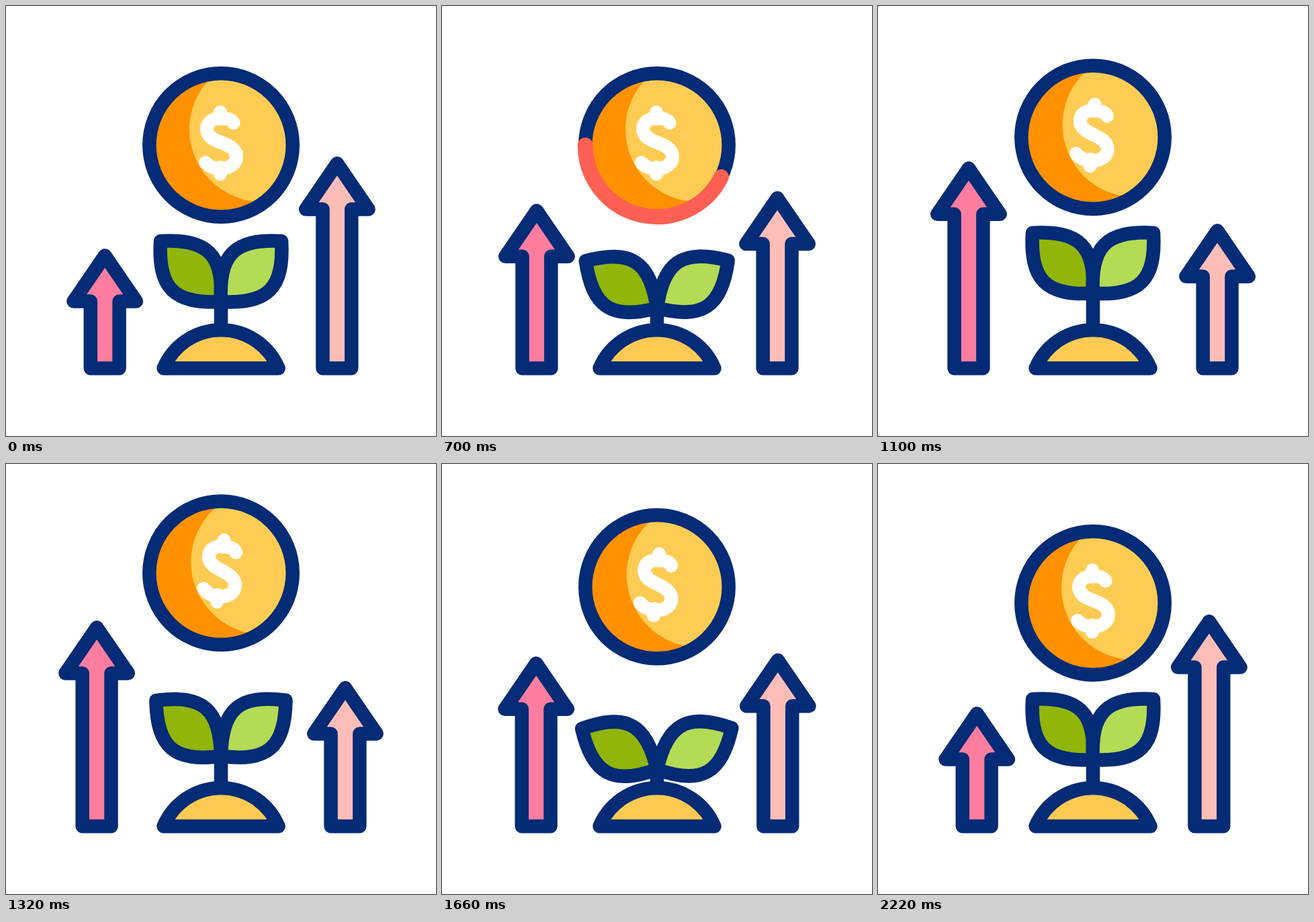
Animation, 640 px wide and 640 px high, one loop 2400 ms. Source, as an HTML page:

```html
<!DOCTYPE html>
<html lang="en">
<head>
<meta charset="utf-8">
<title>Growing investment</title>
<style>
  html, body { margin: 0; width: 100%; height: 100%; overflow: hidden; background: #fff; }
  svg { display: block; width: 100%; height: 100%; }
  .line { stroke: #032b76; stroke-width: 20.5; stroke-linecap: round; stroke-linejoin: round; }
</style>
</head>
<body>
<svg viewBox="0 0 640 640">
  <defs>
    <clipPath id="disc"><circle cx="320" cy="207" r="106.7"/></clipPath>
    <path id="leaf" d="M320 440C250 444 226 420 230 350C300 346 324 370 320 440Z"/>
  </defs>

  <path id="small" class="line" fill="#ff7d9f"/>
  <path id="tall" class="line" fill="#ffbdb8"/>

  <path id="stem" class="line" fill="none"/>
  <use id="left" class="line" href="#leaf" fill="#91b508"/>
  <use id="right" class="line" href="#leaf" fill="#b3db54"/>
  <path class="line" fill="#ffca52" d="M234.5 539.3A92.6 92.6 0 0 1 405.5 539.3Z"/>

  <g id="coin">
    <g id="face">
      <circle cx="320" cy="207" r="106.7" fill="#ff9100"/>
      <circle cx="381" cy="183.5" r="108" fill="#ffcc53" clip-path="url(#disc)"/>
      <path fill="none" stroke="#fff" stroke-width="20" stroke-linecap="round" stroke-linejoin="round"
        d="M338.5 174C336 168 327 167 320 167C308 167 299 173 299 183C299 194 309 199 320 203C333 208 343 213 343 224C343 236 332 242 319 242C309 242 301 238 297 233M319 158V168M319 240V250"/>
    </g>
    <circle class="line" cx="320" cy="207" r="106.7" fill="none"/>
    <path id="sweep" fill="none" stroke="#ff6053" stroke-width="23" stroke-linecap="round"/>
  </g>
</svg>
<script>
const LOOP = 2400, STEP = 20;
const el = id => document.getElementById(id);
const clamp = u => Math.min(1, Math.max(0, u));
const smooth = u => u * u * (3 - 2 * u);

// Eased value through [time, value] keys
function track(keys, t) {
  if (t <= keys[0][0]) return keys[0][1];
  for (let i = 1; i < keys.length; i++) {
    const [t0, a] = keys[i - 1], [t1, b] = keys[i];
    if (t < t1) return a + (b - a) * smooth((t - t0) / (t1 - t0));
  }
  return keys[keys.length - 1][1];
}

const swap = [[200, 0], [1200, 1], [2200, 0]];
const leafDrop = [[200, 0], [600, 12.3], [1080, -12.3], [1180, -12.3], [1600, 15], [2200, 0]];
const leafTurn = [[200, 0], [600, 13], [1080, 0], [1180, 0], [1600, 17], [2200, 0]];
const coinRise = [[1000, 0], [1300, -45], [1600, -22], [1900, -43.5], [2200, 0]];
const coinTurn = [[650, 0], [1400, 6.7], [2200, 0]];

function arrow(x, tip) {
  const neck = tip + 68.2;
  return `M${x} ${tip}L${x + 46.7} ${neck}H${x + 21.4}V539.3H${x - 21.4}V${neck}H${x - 46.7}Z`;
}

function arc(from, to) {
  const point = deg => {
    const a = deg * Math.PI / 180;
    return `${320 + 106.7 * Math.sin(a)} ${207 - 106.7 * Math.cos(a)}`;
  };
  return `M${point(from)}A106.7 106.7 0 ${to - from > 180 ? 1 : 0} 1 ${point(to)}`;
}

function draw(t) {
  const s = track(swap, t);
  el('small').setAttribute('d', arrow(147.2 - 12.6 * s, 371.4 - 133.5 * s));
  el('tall').setAttribute('d', arrow(492.8 + 12.6 * s, 234.3 + 103 * s));

  const drop = track(leafDrop, t), turn = track(leafTurn, t);
  el('stem').setAttribute('d', `M320 ${440 + drop}V482`);
  el('left').setAttribute('transform', `translate(0 ${drop}) rotate(${-turn} 320 440)`);
  el('right').setAttribute('transform',
    `translate(640 ${drop}) scale(-1 1) rotate(${-turn * 0.97} 320 440)`);

  el('coin').setAttribute('transform', `translate(0 ${track(coinRise, t)})`);
  el('face').setAttribute('transform', `rotate(${track(coinTurn, t)} 320 207)`);

  const head = 359.9 * clamp((t - 220) / 640);
  const tail = 360 * clamp((t - 225) / 835) ** 2;
  el('sweep').setAttribute('d', head > tail ? arc(tail, head) : '');
}

function tick() {
  const t = performance.now() % LOOP;
  draw(Math.floor(t / STEP) * STEP);
  requestAnimationFrame(tick);
}
tick();
</script>
</body>
</html>
```
